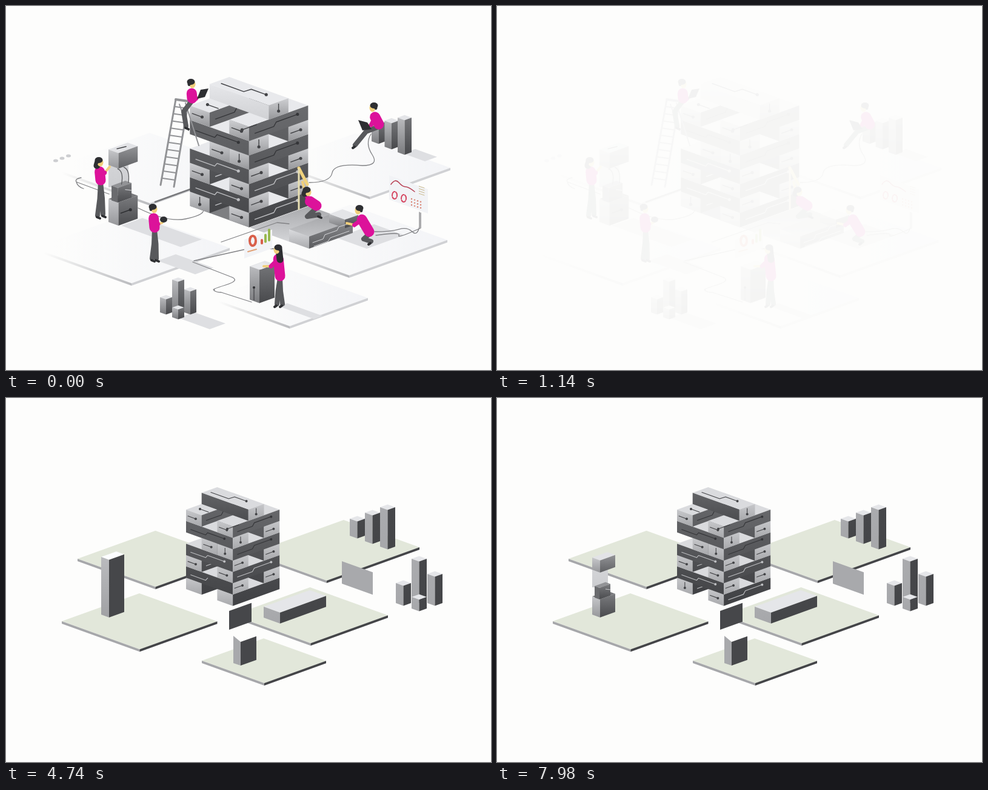
An HTML page with a canvas for the animation above (8000 ms loop, 800 px wide and 600 px high).

```html
<!DOCTYPE html>
<html lang="en">
<head>
<meta charset="utf-8">
<title>Isometric block tower</title>
<style>
html, body { margin: 0; width: 100%; height: 100%; overflow: hidden; background: #fdfdfc; }
canvas { display: block; }
</style>
</head>
<body>
<canvas id="stage" width="800" height="600"></canvas>
<script>
const ctx = document.getElementById('stage').getContext('2d');
const LOOP = 8000, SLOPE = 0.36, BRICK = 25.7, LEVEL = 18.7;
const PAPER = '#fdfdfc', PINK = '#dc129a', SKIN = '#f0cf7c';
const clamp = v => Math.max(0, Math.min(1, v));
const smooth = p => p * p * (3 - 2 * p);
const grey = v => `rgb(${v},${v + 1},${v + 4})`;
const HAIR = grey(46), TROUSERS = grey(88), CABLE = grey(128), INK = grey(66);

// Each face is a pair of grey values, shaded from its top to its bottom.
const FULL = { top: 232, light: [206, 150], dark: 68, slab: [230, 208], floor: grey(126) };
const PLAIN = { top: 218, light: [198, 168], dark: 64, slab: [98, 76], floor: PAPER };
const SOLID = [[170, 166], [70, 68], 229];
const METAL = [[186, 122], [116, 72], 228];
const GROUND = '#e2e7da';

function paint(fill, ys) {
  if (typeof fill === 'number') return grey(fill);
  if (!Array.isArray(fill)) return fill;
  const g = ctx.createLinearGradient(0, Math.min(...ys), 0, Math.max(...ys));
  fill.forEach((v, i) => g.addColorStop(i, grey(v)));
  return g;
}
function poly(fill, ...p) {
  ctx.fillStyle = paint(fill, p.filter((_, i) => i % 2));
  ctx.beginPath();
  for (let i = 0; i < p.length; i += 2) ctx.lineTo(p[i], p[i + 1]);
  ctx.fill();
}
function line(color, width, ...p) {
  ctx.strokeStyle = color;
  ctx.lineWidth = width;
  ctx.lineCap = ctx.lineJoin = 'round';
  ctx.beginPath();
  for (let i = 0; i < p.length; i += 2) ctx.lineTo(p[i], p[i + 1]);
  ctx.stroke();
}
function path(color, d, width = 1.3) {
  ctx.strokeStyle = color;
  ctx.lineWidth = width;
  ctx.stroke(new Path2D(d));
}
function oval(color, x, y, rx, ry = rx) {
  ctx.fillStyle = color;
  ctx.beginPath();
  ctx.ellipse(x, y, rx, ry, 0, 0, 7);
  ctx.fill();
}
// Flat parallelogram: from its left corner, a runs down right, b runs up right.
function tile(fill, x, y, a, b) {
  poly(fill, x, y, x + a, y + a * SLOPE, x + a + b, y + (a - b) * SLOPE, x + b, y - b * SLOPE);
}
// Upright face; dir 1 falls to the right, -1 rises.
function wall(fill, x, y, w, h, dir) {
  const end = y + dir * w * SLOPE;
  poly(fill, x, y - h, x + w, end - h, x + w, end, x, y);
}
function box(x, y, a, b, h, left, right, top) {
  tile(top, x, y - h, a, b);
  wall(left, x, y, a, h, 1);
  wall(right, x + a, y + a * SLOPE, b, h, -1);
}
function placed(dx, dy, scale, draw) {
  ctx.save();
  ctx.translate(dx, dy);
  ctx.scale(scale, scale);
  draw();
  ctx.restore();
}

// A circuit line that grows across one wall and ends in a dot.
function circuit(x, y, w, dir, route, color, p) {
  if (p <= 0) return;
  const pts = route.flatMap(([s, r]) => [x + w * s, y + dir * w * s * SLOPE - LEVEL * r]);
  ctx.setLineDash([w * p, w * 2]);
  line(color, 1.1, ...pts);
  ctx.setLineDash([]);
  if (p === 1) oval(color, ...pts.slice(-2), 2);
}
const ACROSS = [[.12, .5], [.62, .5]];
const DOWN = [[.5, .85], [.5, .35]];
const KINKED = [[.1, .4], [.42, .4], [.46, .65], [.82, .65]];

function tower(pal, t) {
  const long = BRICK * 3;
  tile(pal.floor, 297, 315, long, long);
  for (let level = 0; level < 7; level++) {
    const turned = level % 2, depth = 7 - level;
    const dark = [pal.dark + level * 5 + 8, pal.dark + level * 5];
    // The fifth layer has lost its outer brick.
    const slots = turned ? [2, 0] : level === 4 ? [1, 2] : [0, 2];
    slots.forEach((slot, order) => {
      const d = slot * BRICK, x = 297 + d;
      const y = 315 - level * LEVEL + (turned ? -d : d) * SLOPE;
      const a = turned ? long : BRICK, b = turned ? BRICK : long;
      box(x, y, a, b, LEVEL, turned ? dark : pal.light, turned ? pal.light : dark, pal.top);
      const start = 1860 + 64 * (depth * depth - 1) + order * 260;
      const p = clamp((t - start) / 100), q = clamp((t - start - 300) / 200);
      const end = (level * 2 + slot) % 5 ? ACROSS : DOWN;
      const pale = grey(level < 4 ? 190 : 52);
      circuit(x, y, a, 1, turned ? KINKED : end, turned ? pale : INK, turned ? q : p);
      circuit(x + a, y + a * SLOPE, b, -1, turned ? end : KINKED, turned ? INK : pale, turned ? p : q);
    });
  }
  const x = 297 + BRICK, y = 315 - BRICK * SLOPE - 7 * LEVEL;
  box(x, y, long, BRICK, LEVEL, pal.slab, pal.light, pal.top);
  const p = clamp((t - 2200) / 250);
  circuit(x + long, y + long * SLOPE, BRICK, -1, DOWN, INK, p);
  circuit(x + 12, y - LEVEL, long - 12, 1, [[.05, .1], [.5, .1], [.65, .45], [.95, .45]], INK, p);
  circuit(334, 188, -14, 1, [[0, 0], [1, 0]], INK, p);
  circuit(384, 209, -19, -1, [[0, 0], [1, 0]], INK, p);
}

function column(t, detailed) {
  if (t < 5860) return box(157, 357, 13, 25, 95, [186, 160], 70, 252);
  const pale = [212, 204], left = [198, 150], dark = [122, 74];
  if (t < 6900) {
    poly(pale, 157, 264, 170, 268, 185, 263, 185, 326, 170, 332, 170, 361, 157, 357);
    wall(dark, 170, 288, 25, 20, -1);
    wall(dark, 170, 361, 25, 29, -1);
    return;
  }
  poly(pale, 157, 280, 183, 280, 183, 312, 157, 312);
  box(157, 357, 13, 25, 30, left, dark, 120);
  box(161, 329, 8, 18, 19, 106, dark, 146);
  box(157, 283, 13, 25, 20, left, [146, 96], 226);
  line(grey(200), 1, 179, 315, 187, 316);
  if (!detailed) return;
  line(HAIR, 1, 168, 262, 180, 259);
  circuit(170, 356, 25, -1, ACROSS, HAIR, 1);
  path(TROUSERS, 'M169 288q8 3 5 20M177 286q8 3 6 20', 1);
}

function blockScene(t) {
  const ground = (x, y, a, b) => box(x, y + 4, a, b, 4, 166, 68, GROUND);
  const bar = (x, y, h) => box(x, y, 12.5, 12.5, h, ...SOLID);
  ground(118, 265, 128.5, 128.5);
  ground(404, 256, 125, 153);
  ground(92, 368, 128.5, 128);
  ground(374, 358, 128.5, 127.5);
  ground(323, 433, 103, 102);
  tower(PLAIN, t);
  column(t, false);
  [28, 47, 65].forEach((h, i) => bar(567 + i * 25, 227 + i * 9, h));
  wall(168, 554, 306, 51, 37, 1);
  bar(669, 333, 68);
  bar(643, 338, 33);
  bar(695, 338, 48);
  bar(669, 347, 19);
  box(425, 362, 27, 76, 18, ...SOLID);
  wall(70, 368, 382, 37, 31, -1);
  poly(168, 375, 392, 387, 402, 387, 441, 375, 437);
  wall(70, 387, 441, 26, 39, -1);
}

function paleGround(x, y, a, b) {
  const fade = (to, end) => {
    const g = ctx.createLinearGradient(x, 0, x + end, 0);
    g.addColorStop(.1, PAPER);
    g.addColorStop(1, grey(to));
    return g;
  };
  box(x, y + 4, a, b, 4, fade(186, a), 208, fade(243, a + b));
}

function grounds() {
  paleGround(76, 267, 161, 161);
  line(grey(120), 2.5, 246, 323, 304, 302);
  paleGround(443, 258, 157, 133);
  paleGround(46, 399, 161, 162);
  paleGround(405, 386, 161, 162);
  paleGround(338, 481, 130, 129);
  const shadow = (x, y, a, b) => tile(222, x, y, a, b);
  shadow(190, 362, 98, 35);
  shadow(250, 420, 62, 30);
  shadow(284, 514, 52, 26);
  shadow(655, 243, 36, 20);
  shadow(450, 495, 58, 14);
  shadow(545, 382, 50, 62);
  tile([168, 214], 402, 365, 72, 98);
  for (let i = 0; i < 3; i++) oval(grey(205), 82 + i * 10.5, 255 - i * 4, 4, 2.5);
  path(CABLE, 'M170 310l-54-20q-3-5 8-7M116 290q2 8 12 11M218 333q48 24 78 18t30-15M355 389l92-32 20 2' +
    'M310 420l85-19 48-1M308 422l62 24q18 6-8 14t-18 8M343 469q4 3 12 3l50 16' +
    'M500 291q35 0 38-16t50-12q28 0 16-18t-2-34M608 372q26 0 40-4t22 4 12-8v-24M610 378q42-6 38 0t36-12v-25');
}

function ladder() {
  const rail = grey(146), step = 11.8;
  line(rail, 2, 296, 160, 318, 230);
  line(rail, 2, 286, 162, 301, 205);
  line(rail, 3, 280, 154, 255, 295);
  line(rail, 3, 301, 157, 277, 298);
  for (let i = 0; i < 12; i++)
    line(rail, i ? 2 : 4, 280 - i * 2.1, 154 + i * step, 301 - i * 2.1, 157 + i * step);
}

function ring(color, width, x, y, rx, ry) {
  ctx.setLineDash([8, 2]);
  path(color, `M${x - rx} ${y}a${rx} ${ry} 0 1 1 ${rx * 2} 0a${rx} ${ry} 0 1 1 ${-rx * 2} 0`, width);
  ctx.setLineDash([]);
}
function charts() {
  wall(242, 632, 319, 64, 40, 1);
  path('#b94357', 'M635 294q7-10 13-3t11 7 15 8', 1.6);
  ring('#d54560', 2, 641, 312, 4, 6);
  ring('#d54560', 2, 656, 317, 4, 6);
  for (let i = 0; i < 12; i++)
    oval('#d88372', 669 + i % 4 * 5, 318 + i % 4 * 1.6 + (i / 4 | 0) * 5, 1.2);
  for (let i = 0; i < 4; i++) line('#c9b98b', 1, 681, 297 + i * 4, 690, 300 + i * 4);

  wall(242, 393, 416, 46, 31, -1);
  ring('#d9604b', 4, 407, 387, 5, 8);
  line('#e1a276', 2, 399, 405, 413, 401);
  for (let i = 0; i < 3; i++) {
    const x = 422 + i * 6, y = 391 - i * 2.5;
    line(i ? '#98b84f' : '#d9604b', 4, x, y, x, y - 5 - i * 6);
  }
}

// Limbs hang between a few joints; knees default to halfway down.
function person({ head: [x, y], hip, feet, knee, hand, side = 1, hair = 0 }) {
  const shoulder = [x + (hip[0] - x) * .3, y + 17];
  const elbow = [(shoulder[0] + hand[0]) / 2, (shoulder[1] + hand[1]) / 2 + 6];
  feet.forEach(([fx, fy]) => {
    line(TROUSERS, 8, ...hip, ...(knee || [(hip[0] + fx) / 2 + side, (hip[1] + fy) / 2]), fx, fy);
    line(HAIR, 4, fx - 1, fy + 3, fx + 4 * side, fy + 5);
  });
  line(PINK, 17, ...shoulder, hip[0], hip[1] - 4);
  line(SKIN, 4, ...elbow, ...hand);
  line(PINK, 7, ...shoulder, ...elbow);
  if (hair) line(HAIR, 11, x - side * 2, y, x - side * 4, y + hair);
  oval(SKIN, x + side * 1.5, y + 2, 5, 6.5);
  oval(HAIR, x - side, y - 2, 6.5, 5);
  oval(HAIR, x - side * 4, y + 1, 2.5, 4);
}

function workers() {
  person({ head: [154, 256], hip: [156, 291], feet: [[151, 345], [160, 343]], hand: [171, 265], hair: 7 });
  person({ head: [243, 333], hip: [245, 369], feet: [[241, 416], [248, 416]], hand: [258, 357] });
  oval(HAIR, 260, 352, 6, 5);
  person({ head: [306, 127], hip: [307, 156], knee: [293, 174], feet: [[297, 198]], hand: [321, 149] });
  poly(HAIR, 321, 138, 334, 136, 328, 150, 315, 153);
  person({ head: [606, 166], hip: [615, 199], knee: [594, 207], feet: [[576, 229]], hand: [596, 197], side: -1 });
  poly(HAIR, 581, 188, 596, 192, 603, 203, 588, 205);
  line('#f0d27c', 5, 483, 267, 497, 294);
  line('#e8dfb2', 3, 483, 268, 483, 335);
  person({ head: [497, 305], hip: [512, 333], knee: [497, 347], feet: [[516, 344]], hand: [489, 290], hair: 4 });
  person({ head: [582, 335], hip: [599, 376], knee: [590, 384], feet: [[602, 388]], hand: [562, 358], side: -1 });
  person({ head: [448, 400], hip: [452, 449], feet: [[447, 491], [456, 491]], hand: [425, 429], side: -1, hair: 18 });
}

function workScene() {
  const bar = (x, y, h, w = 10) => box(x, y, w, w, h, ...METAL);
  grounds();
  [32, 43, 57].forEach((h, i) => bar(603 + i * 21.5, 223 + i * 9, h, 11.5));
  placed(-72.4, -68.9, 1.265, () => tower(FULL, LOOP));
  ladder();
  placed(-30.4, -97.4, 1.27, () => column(LOOP, true));
  box(467, 388, 33, 72, 20, [218, 170], [136, 92], [164, 194]);
  box(533, 357, 26, 22, 14, ...METAL);
  path(grey(214), 'M506 390l17-6 3-7 20-7 3-6 19-6M508 396l23-8 4-6 31-11', 1);
  charts();
  box(402, 484, 16, 25, 55, ...METAL);
  tile(234, 405, 429, 15, 17);
  line(HAIR, 1, 409, 485, 409, 466);
  oval(HAIR, 409, 464, 2);
  bar(274, 505, 54);
  bar(254, 505, 25);
  bar(294, 505, 38);
  bar(274, 513, 16);
  workers();
}

function wash(p) {
  ctx.globalAlpha = p;
  ctx.fillStyle = PAPER;
  ctx.fillRect(0, 0, 800, 600);
  ctx.globalAlpha = 1;
}

function frame(now) {
  const t = now % LOOP;
  wash(1);
  if (t < 1270) {
    workScene();
    wash(smooth(clamp((t - 320) / 950)));
  } else {
    blockScene(t);
    wash(1 - smooth(clamp((t - 1270) / 280)));
  }
  requestAnimationFrame(frame);
}
requestAnimationFrame(frame);
</script>
</body>
</html>
```
